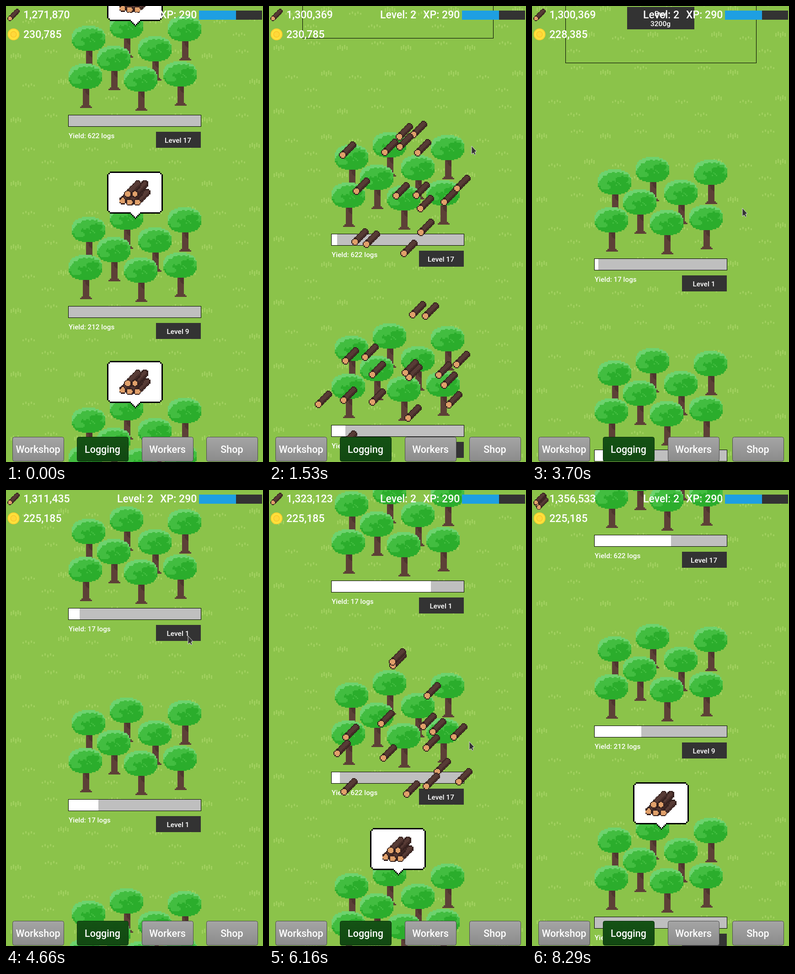
Recreate the animation shown at these times as an HTML page with a canvas. Size 562 px wide and 997 px high, loop 8350 ms.

```html
<!DOCTYPE html>
<html lang="en">
<head>
<meta charset="utf-8">
<title>Logging game</title>
<style>
html, body { margin: 0; width: 100%; height: 100%; overflow: hidden; background: #8bc34a; }
canvas { display: block; }
</style>
</head>
<body>
<canvas id="stage" width="562" height="997"></canvas>
<script>
const LOOP = 8350, PITCH = 417.6, TILE = 139.2;
const ctx = document.getElementById('stage').getContext('2d');
ctx.imageSmoothingEnabled = false;

// ---- timeline ----
const buys = [2523, 3565, 4257];
const gains = [
  { time: 1072, slot: 1, logs: 16811 },
  { time: 1360, slot: 0, logs: 11688 },
  { time: 4400, logs: 11066 },
  { time: 5903, slot: 0, logs: 11688 },
  { time: 6712, slot: 1, logs: 33410 }
];
const scroll = [[0, -190], [1530, 70], [2800, 168], [3700, 124], [4257, 110], [4660, -169], [6160, -1065], [7780, -1583]];
const pointer = [[1000, 300, 590], [1530, 443, 306], [2800, 432, 574], [3700, 460, 442],
  [4660, 398, 319], [6160, 438, 550], [7300, 580, 760]];

// Slot numbers fall towards the top of the list.
const plots = [
  { slot: 2, yield: 96, level: 5 },
  { slot: 1, yield: 212, level: 9 },
  { slot: 0, yield: 622, level: 17 },
  ...buys.map((born, i) => ({ slot: -1 - i, yield: 17, level: 1, born }))
];
const trees = [[227, -222], [354, -216], [144, -195], [289, -172], [199, -151], [344, -117], [137, -112], [258, -106]];

// ---- helpers ----
const clamp = v => Math.max(0, Math.min(1, v));
const smooth = u => u * u * (3 - 2 * u);
const mix = (a, b, u) => a + (b - a) * u;

function random(seed) {
  const v = Math.sin(seed * 12.9898 + 4.1) * 43758.5453;
  return v - Math.floor(v);
}

function rect(x, y, w, h, color, g = ctx) {
  g.fillStyle = color;
  g.fillRect(Math.round(x), Math.round(y), Math.round(w), Math.round(h));
}

// Monotone cubic through the keys
function curve(keys, t, c = 1) {
  let i = 0;
  while (i < keys.length - 2 && t > keys[i + 1][0]) i++;
  const slope = j => keys[j + 1] && keys[j] ? (keys[j + 1][c] - keys[j][c]) / (keys[j + 1][0] - keys[j][0]) : 0;
  const tangent = j => {
    const a = slope(j - 1), b = slope(j);
    return a * b > 0 ? 2 * a * b / (a + b) : 0;
  };
  const [p, q] = [keys[i], keys[i + 1]], d = q[0] - p[0], u = clamp((t - p[0]) / d);
  return mix(p[c], q[c], smooth(u)) + d * u * (1 - u) * ((1 - u) * tangent(i) - u * tangent(i + 1));
}

function sprite(w, h, colorAt) {
  const c = document.createElement('canvas');
  c.width = w;
  c.height = h;
  const g = c.getContext('2d');
  for (let y = 0; y < h; y++)
    for (let x = 0; x < w; x++) {
      const color = colorAt(x + .5, y + .5);
      if (color) rect(x, y, 1, 1, color, g);
    }
  return c;
}

function text(str, x, y, size, align = 'left') {
  ctx.font = `500 ${size}px Roboto, sans-serif`;
  ctx.textAlign = align;
  ctx.textBaseline = 'middle';
  ctx.fillStyle = '#fff';
  ctx.fillText(str, x, y);
}

// ---- sprites ----
const inside = (x, y, cx, cy, rx, ry, power = 2) =>
  Math.abs((x - cx) / rx) ** power + Math.abs((y - cy) / ry) ** power < 1;

const tree = sprite(26, 35, (x, y) => {
  if (inside(x, y, 13, 10, 13.1, 10.1, 2.3)) {
    const wave = Math.sin(x * 1.7) * .7;
    if (!inside(x, y + wave, 14.5, 12, 13.5, 9.6) && y < 11) return '#6dd36f';
    if (inside(x, y + wave, 19, 8.5, 5, 3.2) || inside(x, y + wave, 11, 11, 4.5, 1.7)) return '#2bad2c';
    return y + wave < 14 - x * .12 || inside(x, y, 6, 14, 4, 2) ? '#42bd40' : '#2bad2c';
  }
  if (y < 19) return;
  const half = y > 34 ? 4.6 : y > 33 ? 3.6 : 2.6;
  if (Math.abs(x - 13.5) < half) return y < 25 && x - 11 > (y - 19) * .7 ? '#4e342e' : '#5d4037';
});

// A log runs up and to the right from its cut end.
function logColor(x, y, cx, cy, length = 9) {
  const radius = 3.4, along = clamp((x - cx - y + cy) / 2 / length) * length;
  const d = Math.hypot(x - cx - along, y - cy + along), end = Math.hypot(x - cx, y - cy);
  if (d > radius) return;
  if (end < radius - .9) return '#e0a06a';
  if (end < radius || d > radius - 1) return '#35211e';
  return x + y - cx - cy > 1 ? '#452c28' : '#573b35';
}
const log = sprite(16, 16, (x, y) => logColor(x, y, 3.5, 12.5));
const pile = sprite(30, 25, (x, y) => {
  const ends = [[8.7, 12.5], [15, 12.5], [3.9, 18.8], [10.4, 20], [17.1, 20]];
  const front = ends.find(e => Math.hypot(x - e[0], y - e[1]) < 3.4);
  if (front) return logColor(x, y, ...front);
  return ends.map(e => logColor(x, y, ...e)).find(Boolean);
});

const grass = document.createElement('canvas');
grass.width = grass.height = 139;
function tuft(x, y, step, height) {
  for (let i = -2; i <= 2; i++)
    rect(x + i * step, y - height - Math.abs(i) % 2 * 3, 3, height - Math.abs(i), '#a0d05e', grass.getContext('2d'));
}
[[20, 28], [124, 84]].forEach(([x, y]) => tuft(x, y, 5, 10));
[[48, 90], [97, 16], [90, 118]].forEach(([x, y]) => tuft(x, y, 6, 6));

// ---- scene parts ----
function drawGround(top) {
  rect(0, 0, 562, 997, '#8bc34a');
  const first = ((top % TILE) + TILE) % TILE - TILE;
  for (let y = first; y < 997; y += TILE)
    for (let x = 0; x < 562; x += TILE) ctx.drawImage(grass, Math.round(x), Math.round(y));
}

function drawBubble(y) {
  const x = 221;
  for (let i = 0; i < 3; i++) rect(x + 6 - 3 * i, y + 3 * i, 110 + 6 * i, 92 - 6 * i, '#000');
  rect(x + 6, y + 3, 110, 86, '#fff');
  rect(x + 3, y + 6, 116, 80, '#fff');
  for (let i = 0; i < 5; i++) {
    const half = 13 - 3 * i, row = y + 89 + 3 * i;
    rect(283 - half, row, 2 * half, 3, '#000');
    if (half > 3) rect(286 - half, row, 2 * half - 6, 3, '#fff');
  }
  ctx.drawImage(pile, 246, y + 19, 72, 60);
}

function drawPlot({ slot, level, yield: amount, born }, y, t) {
  for (const [x, dy] of trees) ctx.drawImage(tree, x, y + dy, 73, 97);
  const start = gains.filter(g => g.slot === slot && g.time <= t).pop()?.time ?? born;
  const progress = start === undefined ? 1 : (t - start) / 1000 * (.204 + .0022 * level);
  rect(136, y, 291, 26, '#000');
  rect(137, y + 1, 289, 24, '#bfbfbf');
  if (progress < 1) rect(137, y + 1, 289 * progress, 24, '#fff');
  text(`Yield: ${amount} logs`, 137, y + 47, 15.2);
  rect(328, y + 37, 98, 35, '#333');
  text('Level ' + level, 376, y + 56, 15.5, 'center');
  if (progress >= 1) drawBubble(Math.round(y - 295.5 + 1.7 * Math.sin(t / 200 + (slot - .5) * Math.PI)));
}

function drawOffer(bottom, price) {
  ctx.strokeStyle = '#000';
  ctx.lineWidth = 1;
  ctx.strokeRect(73.5, bottom - 417.5, 417, 418);
  rect(208, bottom - 122, 147, 49, '#333');
  text('Buy', 281, bottom - 107, 15.5, 'center');
  text(price + 'g', 281, bottom - 85, 15.5, 'center');
}

// Logs burst out of the plot, rest, then shrink into the counter.
function drawBurst({ time, slot }, t, barY) {
  const age = t - time;
  if (age < 0 || slot === undefined) return;
  const out = 1 - (1 - clamp(age / 160)) ** 2;
  for (let i = 0; i < 16; i++) {
    const seed = time + i * 3, u = clamp((age - 500) / mix(900, 1200, random(seed))), e = smooth(u);
    if (u === 1) continue;
    const x = 282 + mix(-165, 165, random(seed + 1)) * out;
    const y = barY + slot * PITCH - 96 + mix(-160, 140, random(seed + 2)) * out;
    const size = mix(38, 27, e);
    ctx.drawImage(log, Math.round(mix(x, 17, e) - size / 2), Math.round(mix(y, 19, e) - size / 2), size, size);
  }
}

function drawHud(t, owned) {
  const logs = gains.reduce((sum, g) => g.time <= t ? sum + g.logs : sum, 1271870);
  const gold = 230785 - 800 * (2 ** owned - 1);
  ctx.drawImage(log, 3, 6, 27, 27);
  text(logs.toLocaleString('en-US'), 38, 20, 23);
  for (const [r, color] of [[13, '#fbc92d'], [11.5, '#ffe13b'], [7, '#f9c52b'], [5.5, '#ffd83a']]) {
    ctx.fillStyle = color;
    ctx.beginPath();
    ctx.arc(16.5, 62, r, 0, 7);
    ctx.fill();
  }
  text(gold.toLocaleString('en-US'), 38, 63, 23);
  text('Level: 2', 243, 20, 23);
  text('XP: 290', 337, 20, 23);
  rect(422, 10, 138, 20, '#333');
  rect(422, 10, 81, 20, '#1e9fe2');

  ['Workshop', 'Logging', 'Workers', 'Shop'].forEach((name, i) => {
    const x = Math.round(14 + i * 141.4), active = i === 1;
    const fill = ctx.createLinearGradient(0, 942, 0, 996);
    fill.addColorStop(0, active ? '#145214' : '#a5a5a5');
    fill.addColorStop(1, active ? '#124812' : '#8b8b8b');
    ctx.fillStyle = fill;
    ctx.strokeStyle = active ? '#0c300d' : '#4a4a4a';
    ctx.lineWidth = 1;
    ctx.beginPath();
    ctx.roundRect(x + .5, 942.5, 112, 53, 4);
    ctx.fill();
    ctx.stroke();
    text(name, x + 56, 971, 21.5, 'center');
  });
}

function drawPointer(t) {
  if (t < pointer[0][0] || t > pointer.at(-1)[0]) return;
  ctx.save();
  ctx.translate(curve(pointer, t, 1), curve(pointer, t, 2));
  ctx.beginPath();
  for (const [x, y] of [[0, 0], [0, 18], [4, 15], [7, 20], [9, 18], [7, 13], [11, 12]]) ctx.lineTo(x, y);
  ctx.closePath();
  ctx.fillStyle = '#333';
  ctx.strokeStyle = '#ddd';
  ctx.lineWidth = 1;
  ctx.fill();
  ctx.stroke();
  ctx.restore();
}

function draw() {
  const t = performance.now() % LOOP;
  const owned = buys.filter(b => b <= t).length;
  const bottom = Math.round(curve(scroll, t));
  const barY = bottom + 428 + PITCH * owned;
  drawGround(bottom);
  drawOffer(bottom, 800 << owned);
  for (const p of plots) {
    const y = Math.round(barY + p.slot * PITCH);
    if (!(p.born > t) && y > -90 && y < 1310) drawPlot(p, y, t);
  }
  for (const g of gains) drawBurst(g, t, barY);
  drawHud(t, owned);
  drawPointer(t);
  requestAnimationFrame(draw);
}
draw();
</script>
</body>
</html>
```
